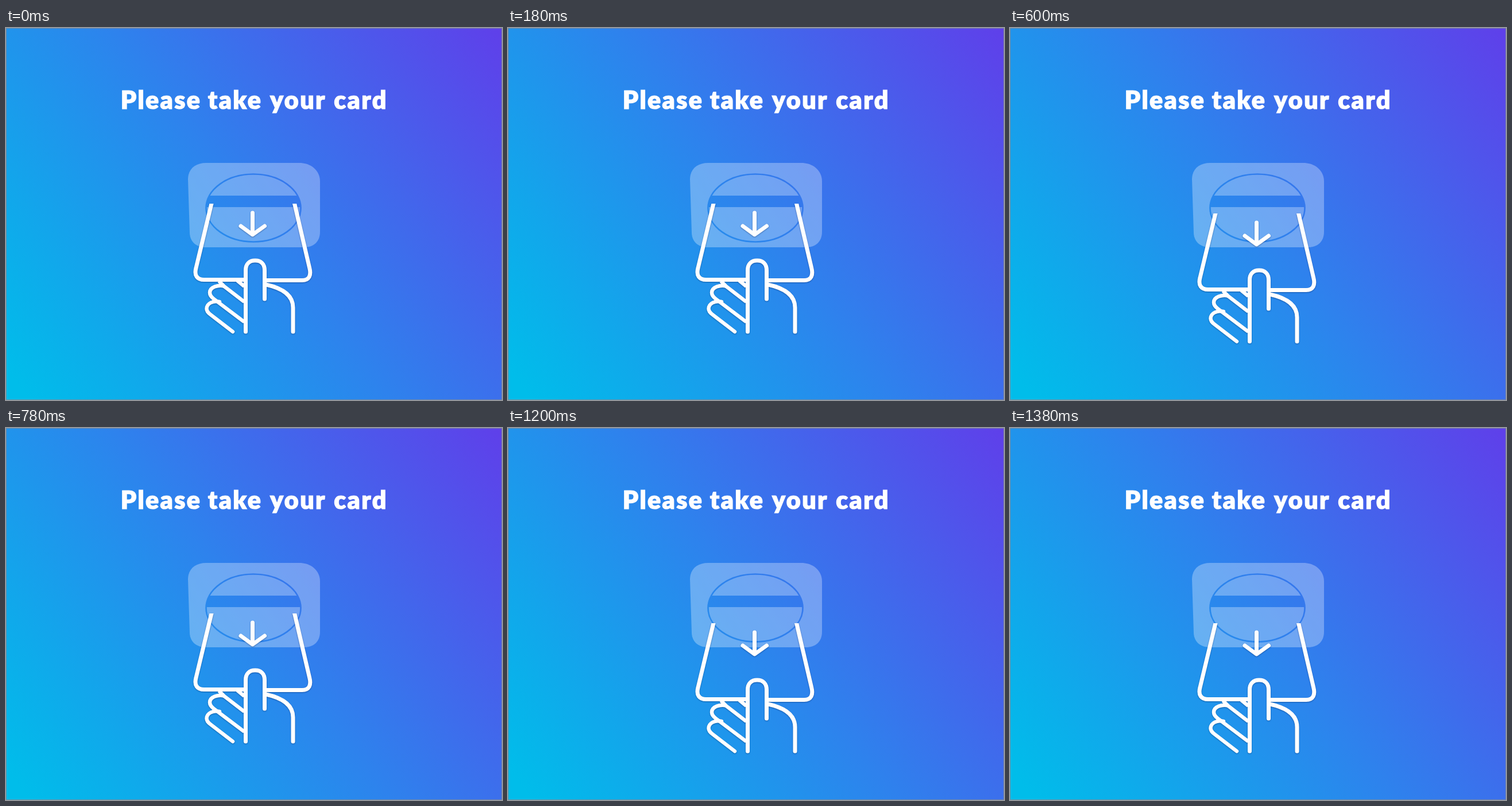
An HTML page for the animation above (1.5 s loop, 864 by 648 pixels).

```html
<!DOCTYPE html>
<html lang="en">
<head>
<meta charset="utf-8">
<title>Please take your card</title>
<style>
  html, body { margin: 0; width: 100%; height: 100%; overflow: hidden; }
  svg { display: block; width: 100vw; height: 100vh; }
  text { font: 900 43px Lato, "Open Sans", sans-serif; letter-spacing: 2.4px; text-anchor: middle; fill: #fff; stroke: #fff; stroke-width: 1.2; }
  #hand { fill: none; stroke: #fff; stroke-width: 7; stroke-linejoin: round; filter: drop-shadow(0 1.5px 1.2px rgba(0, 20, 70, .4)); }
  .round { stroke-linecap: round; }
</style>
</head>
<body>
<svg viewBox="0 0 864 648">
  <defs>
    <linearGradient id="sky" gradientUnits="userSpaceOnUse" x1="0" y1="648" x2="864" y2="0">
      <stop offset=".03" stop-color="#00bdea"/>
      <stop offset=".5" stop-color="#2e82ed"/>
      <stop offset="1" stop-color="#5f3fea"/>
    </linearGradient>
    <clipPath id="oval"><ellipse cx="431" cy="313.5" rx="82.5" ry="59"/></clipPath>
    <clipPath id="below"><path d="M300 306H560V460H300Z"/></clipPath>
  </defs>

  <rect width="864" height="648" fill="url(#sky)"/>
  <rect x=".5" y=".5" width="863" height="647" fill="none" stroke="#808a98" stroke-opacity=".8"/>

  <text y="141"><tspan x="270">Please</tspan><tspan x="399">take</tspan><tspan x="509">your</tspan><tspan x="618">card</tspan></text>

  <!-- Card reader -->
  <path fill="#fff" fill-opacity=".3" d="M317 264C317 246 329 235 349 235H511C532 235 547 249 547 267V355C547 372 536 382 519 382H348C331 382 320.5 372 320 357Z"/>
  <g fill="none" stroke="url(#sky)" stroke-width="2.7">
    <ellipse cx="431" cy="313.5" rx="82.5" ry="59"/>
    <path d="M340 302H522" stroke-width="20" clip-path="url(#oval)"/>
  </g>

  <g id="hand">
    <g clip-path="url(#below)">
      <path d="M359.4 300L331 418C327.5 431 333 438.5 345 438.5H415M501.2 300L528.7 418C532 431 528 439.5 516 439.5H453"/>
    </g>
    <g class="round">
      <path d="M429.5 322V359M409 345L429.5 360L450.5 345"/>
      <path d="M417.5 529V422C417.5 411 424 405 434 405S450.5 411 450.5 422V472"/>
      <path d="M453 447C476 452 500 463 500 487V529"/>
    </g>
    <g stroke-width="6.5">
      <path d="M371 441L380 450L415 477M403 440L415 450"/>
      <path d="M380 449.5C370 447 355 451 355 461C355 466 358 469 362 472L415 512"/>
      <path class="round" d="M372 477C361 474 349.5 480 349.5 489C349.5 493 352 496 356 499L395 529"/>
    </g>
  </g>
</svg>
<script>
  const hand = document.getElementById("hand");
  const STEP_MS = 300, STEPS = 5, STEP_PX = 8.5;

  function draw() {
    const step = Math.floor(performance.now() / STEP_MS) % STEPS;
    hand.setAttribute("transform", `translate(0 ${step * STEP_PX})`);
    requestAnimationFrame(draw);
  }
  draw();
</script>
</body>
</html>
```
